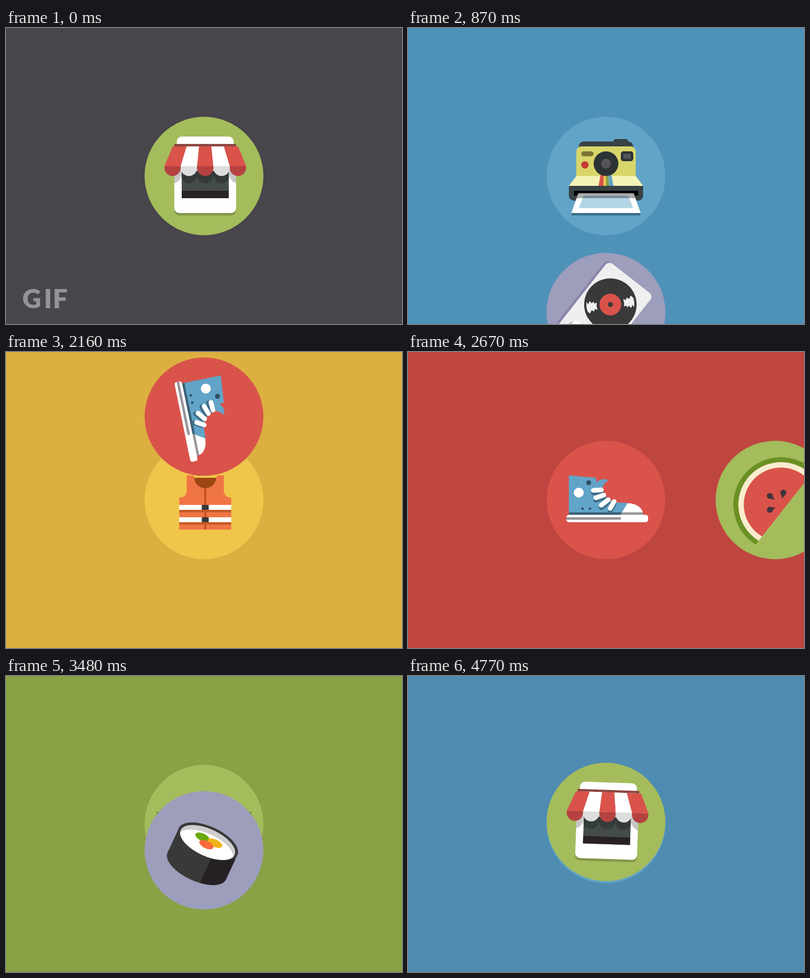
These frames come from a looping animation (800 px wide and 600 px high, 4800 ms). An HTML page:

```html
<!DOCTYPE html>
<html lang="en">
<head>
<meta charset="utf-8">
<title>Flat icons</title>
<style>
  html, body { margin: 0; width: 100%; height: 100%; overflow: hidden; background: #48454b; }
  svg { display: block; width: 100vw; height: 100vh; }
  #label { font: 900 53px Lato, "Open Sans", sans-serif; fill: #949496; }
</style>
</head>
<body>
<svg viewBox="0 0 800 600">
  <defs>
    <g id="shop">
      <circle cx="400" cy="300" r="120" fill="#a4bc5c"/>
      <rect x="340" y="270" width="125" height="110" rx="10" fill="#849749"/>
      <rect x="345" y="220" width="115" height="60" rx="10" fill="#fff"/>
      <path d="M340 284H465V365a10 10 0 0 1-10 10H350a10 10 0 0 1-10-10Z" fill="#fff"/>
      <path d="M355 290H450V345H355Z" fill="#434c4b"/>
      <path d="M355 330H450V345H355Z" fill="#282126"/>
      <clipPath id="front"><path d="M340 284H465V375H340Z"/></clipPath>
      <g id="awningShadow" clip-path="url(#front)" fill="#000" opacity=".22"></g>
      <path d="M340 235H465V240H340Z" fill="#8d4841"/>
      <g id="awning"></g>
    </g>

    <g id="camera">
      <circle cx="400" cy="300" r="120" fill="#62a4c8"/>
      <g fill="#394345">
        <rect x="415" y="225" width="30" height="15" rx="5"/>
        <rect x="345" y="230" width="110" height="30" rx="10"/>
        <path d="M325 320H475V340a10 10 0 0 1-10 10H335a10 10 0 0 1-10-10Z"/>
      </g>
      <path d="M340 300V250a10 10 0 0 1 10-10H450a10 10 0 0 1 10 10V300Z" fill="#d8d66b"/>
      <path d="M340 300H460L475 320H325Z" fill="#f4f3b6"/>
      <path d="M389 297H395.500L395 320H385Z" fill="#d9534b"/>
      <path d="M395.500 297H400V320H395Z" fill="#f0c64a"/>
      <path d="M400 297H405L406 320H400Z" fill="#88a245"/>
      <path d="M405 297H411L415 320H406Z" fill="#62a4c8"/>
      <g fill="#2b3334">
        <circle cx="400" cy="275" r="25"/>
        <rect x="430" y="250" width="25" height="20" rx="5"/>
      </g>
      <g fill="#555457">
        <circle cx="400" cy="275" r="10"/>
        <path d="M435 255H450V265H435Z"/>
      </g>
      <rect x="350" y="250" width="25" height="10" rx="5" fill="#7b7533"/>
      <circle cx="357.500" cy="277.500" r="7.500" fill="#c83935"/>
      <path d="M335 330H465V340H335Z"/>
      <path d="M330 375H470L469 380H331Z" fill="#3d6f8b"/>
      <path d="M344 335H456L470 375H330Z" fill="#fff"/>
      <path d="M355 340H445L455 365H345Z" fill="#b3d5e6"/>
      <path d="M344 335H456L459.500 345H340.500Z" opacity=".33"/>
    </g>

    <g id="turntable">
      <circle cx="400" cy="300" r="120" fill="#9d9dbc"/>
      <rect x="315" y="250" width="170" height="115" rx="10" fill="#8d84ab"/>
      <path d="M450 275V247.500a12.500 12.500 0 0 1 25 0V275Z" fill="#8d84ab"/>
      <rect x="315" y="245" width="170" height="115" rx="10" fill="#efefef"/>
      <g fill="#c8c8c8">
        <path d="M450 245H475V275H450Z"/>
        <rect x="455" y="325" width="15" height="20" rx="7.500"/>
      </g>
      <path d="M460 275H465V325H460Z" fill="#d6d6d6"/>
      <path d="M455 268H460V325H455Z" fill="#868686"/>
      <path d="M445 270V242.500a12.500 12.500 0 0 1 25 0V270Z" fill="#fff"/>
      <rect x="450" y="320" width="15" height="20" rx="7.500" fill="#fff"/>
      <g transform="translate(382.500 302.500)" fill="#393939">
        <circle r="53"/>
        <circle r="22" fill="#d9534b"/>
        <circle r="5"/>
        <g fill="#efefef">
          <path id="glint" transform="rotate(45)" d="M27-8 32-5 34-10 39-7 43-13 47-9Q50 0 47 11L44 6 41 12 37 7 33 10 32 6 27 7 28 0Z"/>
          <use href="#glint" transform="rotate(180)"/>
        </g>
      </g>
    </g>

    <g id="vest">
      <circle cx="400" cy="300" r="120" fill="#f0c64a"/>
      <g transform="translate(402.500 300)">
        <path d="M-52.500 60V-5Q-37.500-5-37.500-20V-50H-25L-21-45H21L25-50H37.500V-20Q37.500-5 52.500-5V60Z" fill="#f07544"/>
        <path d="M-2 -30H2V60H-2Z" fill="#bf5220"/>
        <path d="M-22-45H22A22 21 0 0 1-22-45Z" fill="#9c4612"/>
        <g id="band">
          <path d="M-52.500 20H52.500V25H-52.500Z" fill="#c75a26"/>
          <path d="M-52.500 10H52.500V20H-52.500Z" fill="#fff"/>
          <path d="M-7 10H7V20H-7Z" fill="#393939"/>
        </g>
        <use href="#band" y="25"/>
      </g>
    </g>

    <g id="sneaker">
      <circle cx="400" cy="300" r="120" fill="#d9534b"/>
      <path id="upper" d="M325 250 380 255 381 264Q392 254 405 260 396 265 393 275L397 290 408 300 420 305 444 306 432 330H325Z" fill="#62a4c8"/>
      <clipPath id="upperClip"><use href="#upper"/></clipPath>
      <path d="M443.500 306.500C463 307 475 317 475 330H429Z" fill="#fff"/>
      <path d="M325 325H475V330H325Z" opacity=".4"/>
      <rect x="320" y="330" width="165" height="15" rx="5" fill="#fff"/>
      <path d="M320 335H430V340H320Z" fill="#95959b"/>
      <circle cx="345" cy="285" r="10" fill="#fff"/>
      <g fill="#2f4f63">
        <circle cx="365" cy="265" r="5"/>
        <circle cx="352.500" cy="317.500" r="2.500"/>
        <circle cx="367.500" cy="317.500" r="2.500"/>
      </g>
      <g clip-path="url(#upperClip)"><use href="#laces" y="5" style="stroke:#3e6d88"/></g>
      <path id="laces" d="M374.500 280.500 390.500 279.500M379.500 295.500 395.500 290M390.500 310.500 404.500 299.500M408.500 317 416.500 303" stroke-width="9.500" stroke-linecap="round"/>
    </g>

    <g id="melon">
      <circle cx="400" cy="300" r="120" fill="#a4bc5c"/>
      <clipPath id="slice"><path d="M290 275H510V400H290Z"/></clipPath>
      <g clip-path="url(#slice)">
        <circle cx="400" cy="285" r="96" fill="#6b9023"/>
        <circle cx="400" cy="285" r="86" fill="#f9ecce"/>
        <circle cx="400" cy="285" r="75" fill="#d9534b"/>
      </g>
      <g fill="#43343a">
        <path id="seed" d="M400 301Q402 307 405 310A6 6 0 1 1 395 310Q398 307 400 301Z"/>
        <use href="#seed" transform="translate(-20 -16) rotate(62 400 311)"/>
        <use href="#seed" transform="translate(20 -16) rotate(-62 400 311)"/>
      </g>
    </g>

    <g id="sushi">
      <circle cx="400" cy="300" r="120" fill="#9d9dbc"/>
      <path d="M335 275V335A65 30 0 0 0 465 335V275Z" fill="#393939"/>
      <path d="M420 290H465V335A65 30 0 0 1 420 363.500Z" fill="#252023"/>
      <ellipse cx="400" cy="280" rx="65" ry="30" fill="#393939"/>
      <clipPath id="rice"><ellipse cx="400" cy="282.500" rx="60" ry="27.500"/></clipPath>
      <g clip-path="url(#rice)">
        <path d="M335 250H465V315H335Z" fill="#cfcdcd"/>
        <ellipse cx="400" cy="292.500" rx="60" ry="27.500" fill="#fff"/>
      </g>
      <ellipse cx="386" cy="277" rx="15.500" ry="7.500" fill="#6aa90f"/>
      <ellipse cx="414" cy="277.500" rx="16" ry="7.500" fill="#f0b41a"/>
      <ellipse cx="399.500" cy="287.500" rx="15.500" ry="7.500" fill="#ff6a3d"/>
    </g>

    <g id="rocket">
      <circle cx="400" cy="300" r="120" fill="#62a4c8"/>
      <g transform="translate(405 300)">
        <g fill="#fff">
          <path id="booster" d="M-50 75V-30C-50-39-45-45-40-45S-30-39-30-30V75L-29 77-30 90H-52L-48 75Z"/>
          <use href="#booster" transform="scale(-1 1)" style="fill:#dedede"/>
        </g>
        <path d="M0-92C-18-92-31-70-31-45V15H0Z" fill="#ffad5b"/>
        <path d="M0-92C18-92 31-70 31-45V15H0Z" fill="#de954b"/>
        <g opacity=".25">
          <path id="wing" d="M-20 5C-22 40-44 52-69 60L-68 68-18 78H-10V5Z"/>
          <use href="#wing" transform="scale(-1 1)"/>
        </g>
      </g>
      <g transform="translate(405 300)">
        <use href="#wingTop"/>
        <use href="#wingTop" transform="scale(-1 1)"/>
        <path d="M-22 15H22V79H-22Z" fill="#989898"/>
        <g fill="#393639">
          <rect x="-19" y="74" width="11" height="17" rx="4"/>
          <rect x="8" y="74" width="11" height="17" rx="4"/>
        </g>
        <path d="M0-55C-10-55-16-38-17-25V80H0Z" fill="#fff"/>
        <path d="M0-55C10-55 16-38 17-25V80H0Z" fill="#dedede"/>
        <path d="M0-55C-8-55-13-45-15-35Q0-42 15-35C13-45 8-55 0-55Z" fill="#423f45"/>
        <path d="M-11-15Q-10-25 0-25T11-15Q7-19 0-19T-11-15Z" fill="#393639"/>
        <rect x="-5" y="52" width="10" height="43" rx="5" fill="#cfcfcf"/>
      </g>
    </g>

    <g id="wingTop">
      <path d="M-20 5C-22 40-44 52-69 60L-68 68-18 78H-10V5Z" fill="#dadada"/>
      <path d="M-22 5C-24 38-44 52-69 60L-67 68C-42 58-20 42-15 5Z" fill="#423c46"/>
    </g>
  </defs>

  <rect id="back" width="800" height="600"/>
  <use id="current"/>
  <use id="incoming"/>
  <text id="label" x="33 76.500 94.500" y="568">GIF</text>
</svg>

<script>
const TICK = 30, SLOT = 20, ENTER = 5, TRAVEL = 15, SPIN = 195;
const scenes = [
  ["shop", [72, 69, 75]], ["camera", [79, 146, 184]],
  ["turntable", [126, 121, 156]], ["vest", [219, 176, 64]],
  ["sneaker", [191, 69, 64]], ["melon", [136, 162, 69]],
  ["sushi", [135, 132, 173]], ["rocket", [79, 140, 178]]
];
// Entry offsets: right, bottom, left, top
const sides = [[520, 0], [0, 420], [-520, 0], [0, -420]];
const el = id => document.getElementById(id);

el("laces").setAttribute("stroke", "inherit");
el("laces").removeAttribute("stroke");
el("sneaker").style.stroke = "none";

function buildAwning() {
  const top = [337, 365, 390, 415, 440, 469];
  let stripes = "", shadows = "";
  for (let i = 0; i < 5; i++) {
    const left = 320 + 33 * i, right = left + 33;
    const [upper, lower] = i % 2 ? ["#fff", "#dedede"] : ["#d9534b", "#b54241"];
    const scallop = y => `M${left} ${y}H${right}V${y + 3.5}A16.5 16.5 0 0 1 ${left} ${y + 3.5}Z`;
    stripes += `<path d="M${top[i]} 240H${top[i + 1]}L${right} 280H${left}Z" fill="${upper}"/>`
      + `<path d="${scallop(280)}" fill="${lower}"/>`;
    shadows += `<path d="${scallop(295)}"/><path d="M${left} 280H${right}V295H${left}Z"/>`;
  }
  el("awning").innerHTML = stripes;
  el("awningShadow").innerHTML = shadows;
}

// Steady start, soft landing: cubic-bezier(1/6, 1/6, 2/3, 1)
function ease(x) {
  const curve = (s, a, b) => 3 * (1 - s) * (1 - s) * s * a + 3 * (1 - s) * s * s * b + s * s * s;
  let low = 0, high = 1;
  for (let i = 0; i < 30; i++) {
    const mid = (low + high) / 2;
    if (curve(mid, 1 / 6, 2 / 3) < x) low = mid; else high = mid;
  }
  return curve(low, 1 / 6, 1);
}

function draw(ms) {
  const tick = Math.floor(ms / TICK) % (SLOT * scenes.length);
  const index = Math.floor(tick / SLOT), step = tick % SLOT;
  const [name, color] = scenes[index];
  const [nextName, nextColor] = scenes[(index + 1) % scenes.length];

  const blend = step === SLOT - 1 && index < scenes.length - 1 ? 0.5 : 0;
  const mixed = color.map((c, i) => Math.round(c + (nextColor[i] - c) * blend));
  el("back").setAttribute("fill", `rgb(${mixed})`);
  el("label").style.display = tick === 0 ? "" : "none";

  el("current").setAttribute("href", "#" + name);
  const incoming = el("incoming");
  incoming.style.display = step < ENTER ? "none" : "";
  incoming.setAttribute("href", "#" + nextName);
  const rest = 1 - ease(Math.max(0, step - ENTER) / TRAVEL);
  const [dx, dy] = sides[index % 4];
  incoming.setAttribute("transform",
    `translate(${dx * rest} ${dy * rest}) rotate(${SPIN * rest} 400 300)`);
}

// Laces take their colour from the parent so the shadow copy can recolour them
el("sneaker").style.stroke = "";
el("laces").parentNode.insertBefore(Object.assign(
  document.createElementNS("http://www.w3.org/2000/svg", "g")), el("laces"))
  .append(el("laces"));
el("laces").parentNode.setAttribute("stroke", "#fff");

buildAwning();
const start = performance.now();
function loop() {
  draw(performance.now() - start);
  requestAnimationFrame(loop);
}
draw(0);
requestAnimationFrame(loop);
</script>
</body>
</html>
```
